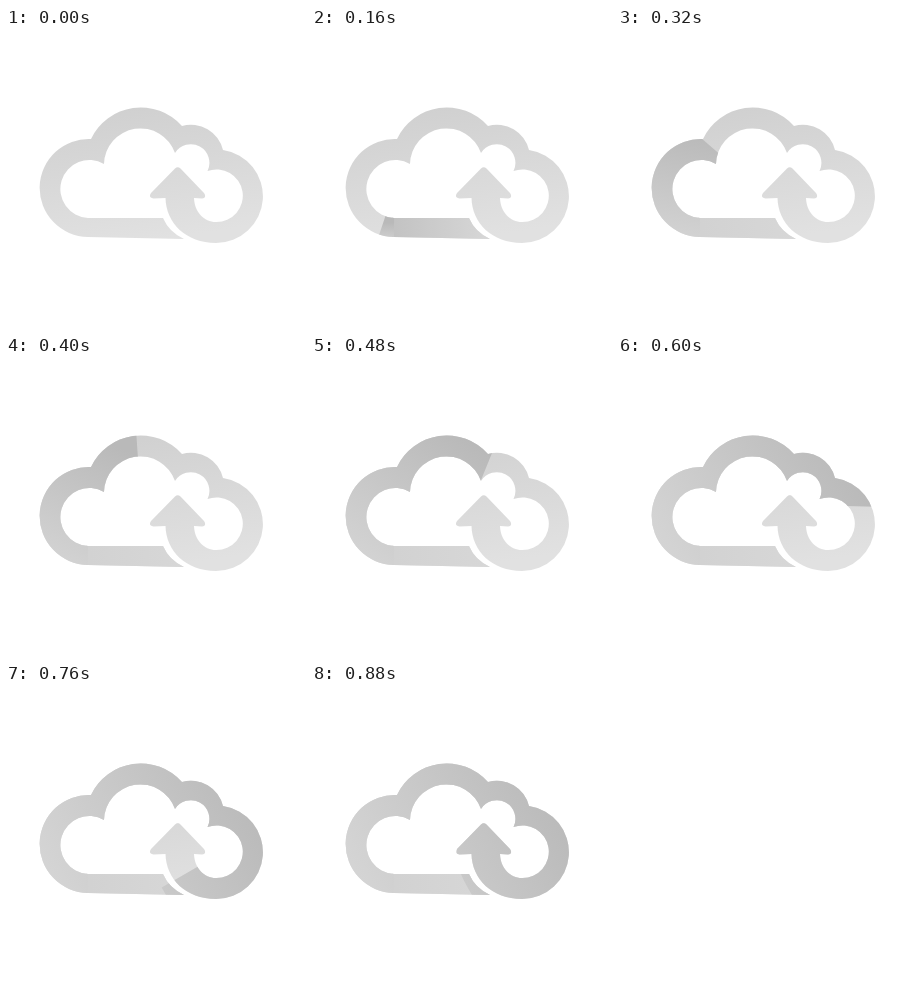
Recreate the animation shown at these times as an HTML page without scripts. Size 300x300 px, loop 1 s.

```html
<!DOCTYPE html>
<html lang="en">
<head>
<meta charset="utf-8">
<title>Cloud upload</title>
<style>
  html, body { margin: 0; width: 100%; height: 100%; overflow: hidden; background: #fff; }
  svg { display: block; width: 100vw; height: 100vh; }
  .sweep { fill: none; stroke-width: 56; }
  .tail { stroke: url(#tailTone); stroke-dasharray: 120 400; animation: tail 1s infinite; }
  .body { stroke: url(#bodyTone); stroke-dasharray: 500 900; animation: body 1s infinite; }
  .fade { animation: fade 1s linear infinite; }

  /* one jump every 40 ms */
  @keyframes tail {
    0% { stroke-dashoffset: 120; animation-timing-function: steps(4); }
    16%, 100% { stroke-dashoffset: 10; }
  }
  @keyframes body {
    0%, 12% { stroke-dashoffset: 500; animation-timing-function: steps(1); }
    16% { stroke-dashoffset: 488; animation-timing-function: steps(4); }
    32% { stroke-dashoffset: 369; animation-timing-function: steps(4); }
    48% { stroke-dashoffset: 268; animation-timing-function: steps(3); }
    60% { stroke-dashoffset: 182; animation-timing-function: steps(4); }
    76% { stroke-dashoffset: 81; animation-timing-function: steps(3); }
    88%, 100% { stroke-dashoffset: 0; }
  }
  @keyframes fade {
    0%, 16% { stop-color: #bfbfbf; }
    32%, 100% { stop-color: #d1d1d1; }
  }
</style>
</head>
<body>
<svg viewBox="0 0 300 300">
  <defs>
    <linearGradient id="baseTone" gradientUnits="userSpaceOnUse" x1="110" y1="80" x2="130" y2="215">
      <stop stop-color="#d0d0d0"/><stop offset="1" stop-color="#e1e1e1"/>
    </linearGradient>
    <linearGradient id="tailTone" gradientUnits="userSpaceOnUse" x1="65" y1="0" x2="178" y2="0">
      <stop class="fade" stop-color="#bfbfbf"/><stop offset="1" stop-color="#d7d7d7"/>
    </linearGradient>
    <!-- the dark end follows the head of the sweep -->
    <linearGradient id="bodyTone" gradientUnits="userSpaceOnUse" x1="60" y1="215" x2="250" y2="110">
      <stop stop-color="#d4d4d4"/><stop offset="1" stop-color="#b9b9b9"/>
      <animate attributeName="x2" dur="1s" repeatCount="indefinite"
        keyTimes="0;.16;.32;.48;.6;.76;1" values="60;60;80;150;235;250;250"/>
      <animate attributeName="y2" dur="1s" repeatCount="indefinite"
        keyTimes="0;.16;.32;.48;.6;.76;1" values="195;195;105;80;105;110;110"/>
    </linearGradient>
    <clipPath id="cloud">
      <path d="M178 211L82 209A49.03 49.03 0 1 1 85 111A55 55 0 0 1 176 98A33 33 0 0 1 217 122
        A46.75 46.75 0 0 1 210 215C180 215 160 195 159.5 170L147.5 170.5Q142 169.500 145 165L169 140.500
        Q171.700 138 174.500 140.500L198 165Q201 169.500 196 170.500L188 170C188.500 184 198 194 210 194
        A26.3 26.3 0 1 0 201.500 143A18.600 18.600 0 0 0 169 125A36.5 36.5 0 0 0 98 136A29 29 0 1 0 82 190
        H157Q163 204 178 211Z"/>
    </clipPath>
    <clipPath id="strip"><path d="M0 0H158V185Q164 204 184 214V230H0Z"/></clipPath>
  </defs>
  <g clip-path="url(#cloud)">
    <rect width="300" height="300" fill="url(#baseTone)"/>
    <g clip-path="url(#strip)"><path class="sweep tail" d="M180 200L80 199.500"/></g>
    <path class="sweep body" d="M82 199.500A38.500 38.500 0 0 1 83 122.500Q88.300 122.500 97 109
      A44.500 44.500 0 0 1 165.500 102C168 104.500 170 109 174 111C178 113 181 106.500 187 106.500
      A26 26 0 0 1 209.400 123.600C213 133 236 125 236 145C236 180 228 204.500 205 204.500
      C195 204.500 187 203 183 195C178 186 173.500 180 173 170V132"/>
  </g>
</svg>
</body>
</html>
```
